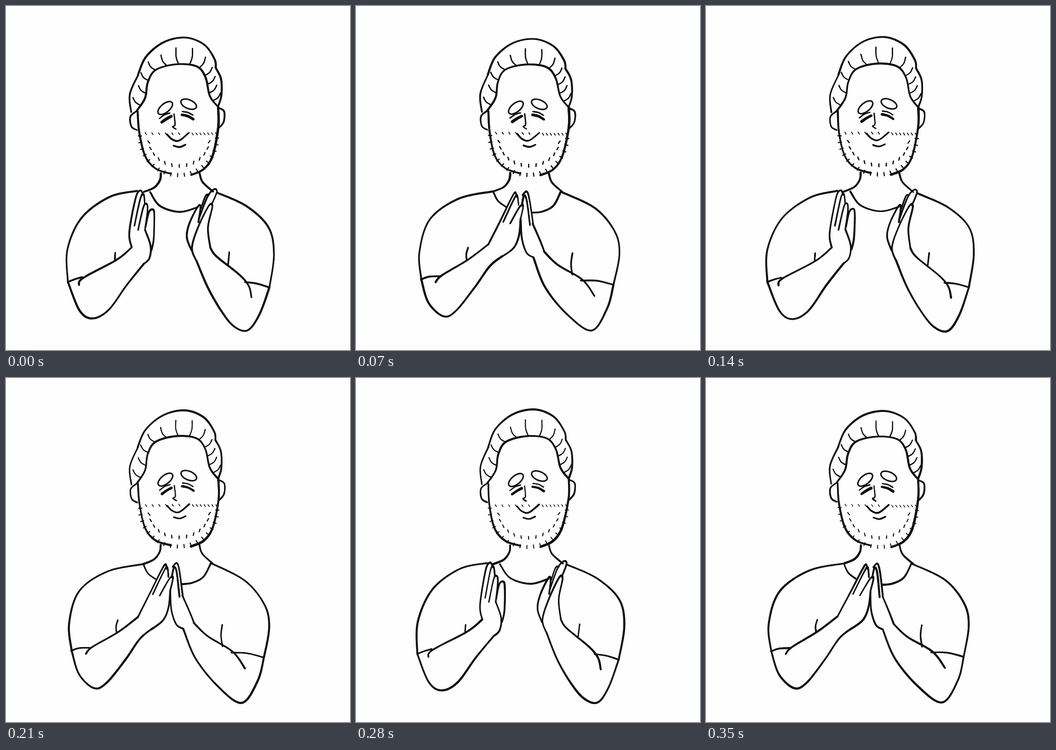
These frames come from a looping animation (748 by 748 pixels, 0.42 s). An HTML page with a canvas:

```html
<!DOCTYPE html>
<html lang="en">
<head>
<meta charset="utf-8">
<title>Clapping man</title>
<style>
html, body { margin: 0; width: 100%; height: 100%; overflow: hidden; background: #fefefe; }
canvas { display: block; width: 748px; height: 748px; }
</style>
</head>
<body>
<canvas id="stage" width="748" height="748"></canvas>
<script>
const ctx = document.getElementById('stage').getContext('2d');
const STEP = 70, COUNT = 6;
const { PI, sin, cos, sign, tanh, exp } = Math;

let drawing = 0; // which of the hand-inked drawings is being made
const isShut = () => drawing % 2 === 1;

// Each drawing is slightly redrawn; the hair also flattens when the hands meet.
function warp([x, y]) {
  const p = drawing * 2.4;
  const dip = isShut() ? 3 * Math.max(0, (150 - y) / 80) : 0;
  return [x + 0.8 * sin(y / 45 + p), y + 0.8 * sin(x / 45 + 2 * p) + dip];
}

// Smooth curve through key points written as "x,y x,y ...".
function trace(keys) {
  const pts = keys.split(' ').map(p => p.split(',').map(Number));
  const n = pts.length - 1, cuts = 12, out = [pts[0]];
  const at = i => pts[Math.max(0, Math.min(n, i))];
  for (let i = 0; i < n; i++) {
    for (let k = 1; k <= cuts; k++) {
      const t = k / cuts;
      out.push([0, 1].map(j => {
        const [a, b, c, d] = [-1, 0, 1, 2].map(o => at(i + o)[j]);
        return b + t / 2 * (c - a + t * (2 * a - 5 * b + 4 * c - d + t * (3 * (b - c) + d - a)));
      }));
    }
  }
  return out;
}

// Ink line whose width swells gently along the way.
function ink(width, line) {
  line.map(warp).forEach((p, i, all) => {
    if (!i) return;
    ctx.lineWidth = width * (1 + 0.12 * sin(i / 9 + drawing));
    ctx.beginPath();
    ctx.moveTo(...all[i - 1]);
    ctx.lineTo(...p);
    ctx.stroke();
  });
}

const curve = (width, keys) => ink(width, trace(keys));

function bristle(x, y, angle, length, width) {
  const dx = cos(angle) * length / 2, dy = sin(angle) * length / 2;
  ink(width, [[x - dx, y - dy], [x + dx, y + dy]]);
}

function brow(x, y, rx, ry, tilt) {
  ctx.lineWidth = 3.2;
  ctx.beginPath();
  ctx.ellipse(...warp([x, y]), rx, ry, tilt, 0, 2 * PI);
  ctx.stroke();
}

// Point at a fraction of a line's length.
function along(line, part) {
  const step = line.map((p, i) => i ? Math.hypot(p[0] - line[i - 1][0], p[1] - line[i - 1][1]) : 0);
  let left = part * step.reduce((a, b) => a + b), i = 1;
  while (i < line.length - 1 && left > step[i]) left -= step[i++];
  const [a, b] = [line[i - 1], line[i]], t = left / step[i];
  return [a[0] + (b[0] - a[0]) * t, a[1] + (b[1] - a[1]) * t];
}

function hair() {
  const hairline = trace('285,228 303,200 309,165 326,138 370,126 414,131 434,155 444,196 462,220');
  ink(4, hairline);
  curve(3.4, '273,231 270,192 288,149');
  curve(4, '287,150 304,110 342,78 389,68 430,84 453,116 456,135');
  curve(4, '456,135 468,160 469,195 462,219');
  const locks = 12;
  for (let k = 0; k < locks; k++) {
    const u = k / (locks - 1), s = 2 * u - 1;
    const [x, y] = along(hairline, 0.05 + 0.89 * u + 0.06 * sin(PI * u));
    const dx = 17 * tanh(4 * s), dy = -17 - 21 * exp(-16 * s * s);
    curve(2.4, `${x + dx},${y + dy} ${x + dx / 2 + 2.5 * sign(s)},${y + dy / 2 + 2} ${x},${y}`);
  }
}

function beard() {
  for (let i = 0; i < 6; i++) bristle(304 + 14.5 * i, 277, 1, 5, 1.8);
  for (let i = 0; i < 7; i++) bristle(406 + 8.5 * i, 278, 1, 5, 1.8);
  for (let i = 0; i < 13; i++) {
    const a = PI * (0.03 + 0.94 * i / 12);
    bristle(376 + 66 * cos(a), 290 + 57 * sin(a), 2.2 - 1.3 * i / 12, 6, 2.5);
  }
  for (let i = 0; i < 19; i++) {
    const a = PI * (0.01 + i / 18);
    bristle(375 + 84 * cos(a), 285 + 82 * sin(a), a, 7, 2.3);
  }
}

function face() {
  curve(4, '287,229 290,275 302,326 325,353 358,364');
  curve(4.8, '462,220 462,263 449,325 430,354 402,367');
  curve(3.3, '284,229 271,241 273,262 285,270');
  curve(3.5, '463,222 475,230 474,252 464,265');
  brow(347, 221, 19, 9.5, -0.68);
  brow(398, 213, 18, 9.5, 0.4);
  curve(2.6, '334,244 345,236 357,232');
  curve(5.5, '339,252 349,245 360,239');
  curve(2.6, '384,229 396,231 407,237');
  curve(5, '383,236 396,239 408,246');
  curve(2.6, '366,234 368,257 363,262 370,267');
  curve(3.5, '350,278 361,289 376,292 398,275');
  curve(3.4, '364,303 377,306 390,301');
}

function neck() {
  curve(4.2, '336,363 334,378 322,394 299,404');
  curve(3.8, '420,363 427,383 450,404');
}

function handsApart() {
  curve(3.8, '313,404 335,434 378,447 418,437');

  curve(4, '285,402 225,416 165,461 134,530 134,600');
  curve(4.2, '134,600 159,662 187,680 222,662 262,607 300,560');
  curve(3.4, '134,600 150,594 165,590');
  curve(4, '158,607 167,592 240,553 274,525');
  curve(3.2, '238,537 237,552');
  curve(3.6, '274,525 269,492 282,417 292,401 298,411');
  curve(3.2, '280,478 292,419 299,409 302,431');
  curve(3.2, '288,487 299,437 306,430 308,444 303,486');
  curve(3.8, '304,480 311,448 320,442 323,455 322,505 317,530');
  curve(3.6, '303,486 315,521 312,548 299,561');

  curve(4, '460,407 525,437 572,482 583,540 572,612');
  curve(4.2, '414,553 438,612 467,663 495,697 525,706 550,672 572,612');
  curve(3.6, '519,601 545,604 572,612');
  curve(4, '445,526 458,545 507,585 527,609 533,634');
  curve(3.2, '486,536 483,563');
  curve(3.4, '420,463 438,415 452,399 458,405 447,433');
  curve(3.2, '424,440 434,413 441,411');
  curve(3.6, '413,552 405,525 418,482 441,435 449,436 440,482 445,526');
  curve(3.8, '404,531 394,502 400,471 418,435 423,439 419,470');
}

function handsTogether() {
  curve(3.3, '299,404 309,424 326,437');
  curve(4, '446,403 430,433 406,446 383,449');

  curve(4, '298,404 222,420 160,464 137,535 142,594');
  curve(4.2, '142,594 158,644 190,674 217,664 258,613 290,567 318,544');
  curve(3.7, '141,594 158,588 182,587');
  curve(4, '173,600 187,585 243,552 287,519');
  curve(3.2, '243,526 239,540 240,553');
  curve(3.6, '287,519 315,465 338,419 347,405 350,415');
  curve(3.3, '320,470 343,422 351,411 354,433');
  curve(3.3, '335,473 356,437 364,434 358,462');
  curve(4, '358,462 354,498 342,526 316,546');

  curve(3.9, '446,403 520,440 562,491 572,540 560,607');
  curve(4.2, '385,546 411,610 460,670 513,706 547,658 560,607');
  curve(3.5, '489,597 524,598 560,607');
  curve(4, '408,533 438,562 492,595 519,631');
  curve(3.3, '470,537 467,560 470,584');
  curve(3.6, '363,411 372,403 378,422 385,474');
  curve(4, '361,434 366,412 372,424 378,476');
  curve(3.7, '384,473 399,508 409,534');
  curve(3.6, '358,464 360,505 370,536 385,546');
}

function draw() {
  ctx.fillStyle = '#fefefe';
  ctx.fillRect(0, 0, 748, 748);
  ctx.strokeStyle = '#111';
  ctx.lineCap = ctx.lineJoin = 'round';
  hair();
  face();
  beard();
  neck();
  isShut() ? handsTogether() : handsApart();
}

const start = performance.now();
let shown = -1;
function tick() {
  drawing = Math.floor((performance.now() - start) / STEP) % COUNT;
  if (drawing !== shown) draw();
  shown = drawing;
  requestAnimationFrame(tick);
}
tick();
</script>
</body>
</html>
```
